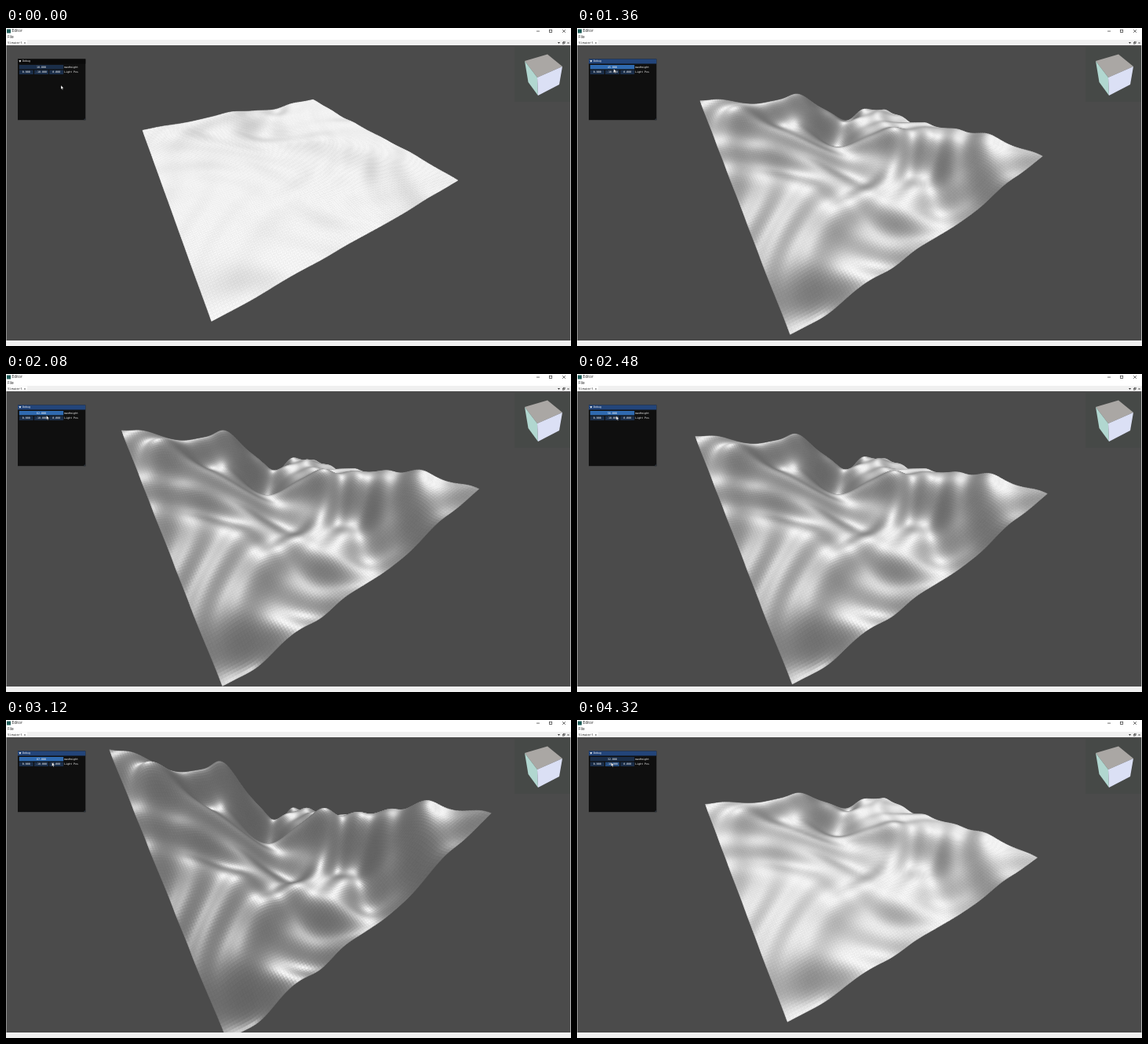
Animation, 720 px wide and 405 px high, one loop 4.4 s. Source, as an HTML page with a canvas:

```html
<!DOCTYPE html>
<html lang="en">
<head>
<meta charset="utf-8">
<title>Editor</title>
<style>
html, body { margin: 0; width: 100%; height: 100%; overflow: hidden; background: #4b4b4b; }
canvas { display: block; }
</style>
</head>
<body>
<canvas id="stage" width="720" height="405"></canvas>
<script>
const ctx = document.getElementById('stage').getContext('2d');
const LOOP = 4400, STEP = 80, CELLS = 110;
const MONO = '"DejaVu Sans Mono", monospace', SANS = '"Open Sans", sans-serif';
const DRAG_START = 720, DRAG_END = 3760;

// Hills and hollows: centre a, centre b, radius, rise.
const MOUNDS = [
  [0.14, 0.14, 0.10, 0.20], [0.30, 0.13, 0.08, -0.20], [0.44, 0.00, 0.10, 0.32],
  [0.71, 0.02, 0.09, -0.50], [0.54, 0.23, 0.13, -0.62], [0.47, 0.54, 0.16, -0.42],
  [0.21, 0.43, 0.10, -0.18], [0.72, 0.46, 0.09, 0.20], [0.70, 0.72, 0.13, -0.36],
  [0.85, 0.60, 0.10, 0.14], [0.66, 0.97, 0.13, -0.36], [0.36, 0.94, 0.15, -0.30],
  [0.09, 1.00, 0.10, -0.28], [0.94, 0.80, 0.13, 0.20], [1.00, 0.28, 0.09, -0.18]
];

// [time, height setting] and [time, x, y] of the pointer outside the drag.
const HEIGHT_KEYS = [[560, 10], [960, 31], [1360, 45], [1800, 92], [2080, 62], [2360, 53],
  [2800, 64], [3240, 95], [3520, 67], [DRAG_END, 32]];
const APPROACH = [[0, 70, 73], [80, 54, 62], [240, 47, 59], [560, 37, 51]];
const RETREAT = [[DRAG_END, 43, 54], [4000, 74, 43], [4160, 43.5, 54]];

const mix = (a, b, f) => a + (b - a) * f;

function track(keys, t, i) {
  const next = keys.findIndex(key => key[0] > t);
  if (next < 0) return keys[keys.length - 1][i];
  if (next === 0) return keys[0][i];
  const a = keys[next - 1], b = keys[next];
  return mix(a[i], b[i], (t - a[0]) / (b[0] - a[0]));
}

// A twisted plane through the four corners, with mounds and a fine ripple.
function reliefAt(a, b) {
  const plane = mix(mix(1, -0.46, a), mix(-0.54, 0.735, a), b);
  const ripple = Math.sin(25 * a + 2 * Math.sin(9 * b)) * Math.sin(25 * b + 2 * Math.sin(8 * a));
  return MOUNDS.reduce((sum, [x, y, r, rise]) =>
    sum + rise * Math.exp(-((a - x) ** 2 + (b - y) ** 2) / (r * r)), plane + 0.045 * ripple);
}

const relief = Array.from({ length: CELLS + 1 }, (_, j) =>
  Array.from({ length: CELLS + 1 }, (_, i) => reliefAt(i / CELLS, j / CELLS)));

function project(a, b, z) {
  const w = 1 + 0.288 * a - 0.485 * b - z;
  return [(178.5 + 325.6 * a - 45.25 * b - 370 * z) / w, (140 - 27.3 * a + 49.5 * b - 560 * z) / w];
}

function shape(points, fill) {
  ctx.beginPath();
  points.forEach(([x, y]) => ctx.lineTo(x, y));
  ctx.closePath();
  ctx.fillStyle = fill;
  ctx.fill();
}

function outline(color, width) {
  ctx.strokeStyle = color;
  ctx.lineWidth = width;
  ctx.stroke();
}

function rect(x, y, w, h, fill) {
  ctx.fillStyle = fill;
  ctx.fillRect(x, y, w, h);
}

function frame(x, y, w, h, color, width) {
  ctx.strokeStyle = color;
  ctx.lineWidth = width;
  ctx.strokeRect(x, y, w, h);
}

function text(str, x, y, size, fill, family = MONO, align = 'left') {
  ctx.font = `${size}px ${family}`;
  ctx.textAlign = align;
  ctx.textBaseline = 'middle';
  ctx.fillStyle = fill;
  ctx.fillText(str, x, y);
}

function cross(x, y, r, color, width) {
  ctx.beginPath();
  for (const s of [-1, 1]) {
    ctx.moveTo(x - r, y - s * r);
    ctx.lineTo(x + r, y + s * r);
  }
  outline(color, width);
}

function drawTerrain(height) {
  const points = relief.map((row, j) =>
    row.map((n, i) => project(i / CELLS, j / CELLS, n * height * 0.00224)));
  ctx.save();
  ctx.beginPath();
  ctx.rect(0, 22, 720, 376);
  ctx.clip();
  // Far cells first, so that near ones cover them.
  for (let j = 0; j < CELLS; j++) {
    for (let i = CELLS - 1; i >= 0; i--) {
      const n = relief[j][i], e = relief[j][i + 1], s = relief[j + 1][i], d = relief[j + 1][i + 1];
      const slope = Math.hypot(e + d - n - s, s + d - n - e) / 2 * CELLS * height * 0.0092;
      const grey = Math.round(255 * (0.36 + 0.61 / (1 + slope * slope)));
      const color = `rgb(${grey},${grey},${grey})`;
      shape([points[j][i], points[j][i + 1], points[j + 1][i + 1], points[j + 1][i]], color);
      outline(color, 0.6);
    }
  }
  ctx.restore();
}

function drawWindow() {
  rect(0, 0, 720, 405, '#fff');
  rect(1, 1.5, 5, 5, '#1f5c58');
  text('Editor', 7.5, 4.2, 4.8, '#222', SANS);
  text('File', 2, 12, 4.8, '#222', SANS);
  rect(676, 3.7, 4, 0.7, '#333');
  frame(692.5, 2.3, 3.2, 3.2, '#333', 0.7);
  cross(711, 4, 1.9, '#333', 0.7);
  rect(0, 15, 720, 7, '#f0f0f0');
  rect(0, 15.5, 27, 6.5, '#fff');
  text('Viewport', 2, 19, 3.9, '#333');
  cross(24, 19, 1, '#555', 0.5);
  shape([[703, 18], [706, 18], [704.5, 20]], '#333');
  frame(709.5, 18.2, 2, 2, '#333', 0.5);
  frame(710.5, 17.2, 2, 2, '#333', 0.5);
  cross(716.5, 19, 1.1, '#333', 0.6);
  rect(0.4, 22, 719, 376, '#4b4b4b');
  rect(0, 398, 720, 7, '#f0f0f0');
}

function drawCube() {
  rect(648, 24, 71, 70, '#464947');
  const left = [661, 42], front = [677, 63], right = [709, 49], low = [678, 86];
  shape([left, [690, 33.5], right, front], '#aaa7a4');
  shape([left, front, low, [665.5, 69]], '#b1d7d0');
  shape([front, right, [705, 72], low], '#dbe0f5');
}

function drawPanel(t, height) {
  const idle = '#1b2e49', hover = '#234a7c', active = '#2f6ab0';
  rect(15, 39.5, 86.3, 77.7, '#0f0f0f');
  rect(15, 39.5, 86.3, 6, t >= 480 ? '#23457a' : '#0a0a0a');
  shape([[16.4, 41.2], [19.4, 41.2], [17.9, 43.8]], '#fff');
  text('Debug', 21, 42.6, 3.3, '#fff');
  shape([[101.3, 114.5], [101.3, 117.2], [98.5, 117.2]], '#2a3038');

  const field = (x, y, w, value, fill) => {
    rect(x, y, w, 5.4, fill);
    text(value, x + w / 2, y + 2.8, 3.3, '#fff', MONO, 'center');
  };
  const dragging = t >= DRAG_START && t < 4000;
  field(16.8, 47, 56.4, height.toFixed(3), dragging ? active : t === 560 ? hover : idle);
  [0, -10, 0].forEach((value, i) =>
    field(16.8 + 19.2 * i, 53.6, 18, value.toFixed(3), i === 1 && t >= 4160 ? hover : idle));
  text('maxHeight', 74.2, 49.8, 3.3, '#fff');
  text('Light Pos', 74.2, 56.4, 3.3, '#fff');
}

function drawPointer(t, height) {
  let x, y;
  if (t >= DRAG_START && t < DRAG_END) {
    x = 37 + (height - 10) * 0.28;
    y = Math.min(54, 51 + (t - DRAG_START) / 700);
  } else {
    const keys = t < DRAG_START ? APPROACH : RETREAT;
    x = track(keys, t, 1);
    y = track(keys, t, 2);
  }
  const arrow = [[0, 0], [0, 5], [1.1, 4], [1.9, 5.8], [2.7, 5.4], [1.9, 3.7], [3.5, 3.6]];
  shape(arrow.map(([dx, dy]) => [x + dx, y + dy]), '#fff');
  outline('#000', 0.3);
}

function draw(t) {
  const height = Math.round(track(HEIGHT_KEYS, t, 1));
  drawWindow();
  drawTerrain(height);
  drawCube();
  drawPanel(t, height);
  drawPointer(t, height);
}

const isHeld = t => (200 + 4550 - t) % 455 < STEP;

let shown = -1;
const start = performance.now();
function tick() {
  let t = Math.floor((performance.now() - start) % LOOP / STEP) * STEP;
  if (isHeld(t)) t -= STEP;
  if (t !== shown) draw(shown = t);
  requestAnimationFrame(tick);
}
tick();
</script>
</body>
</html>
```
